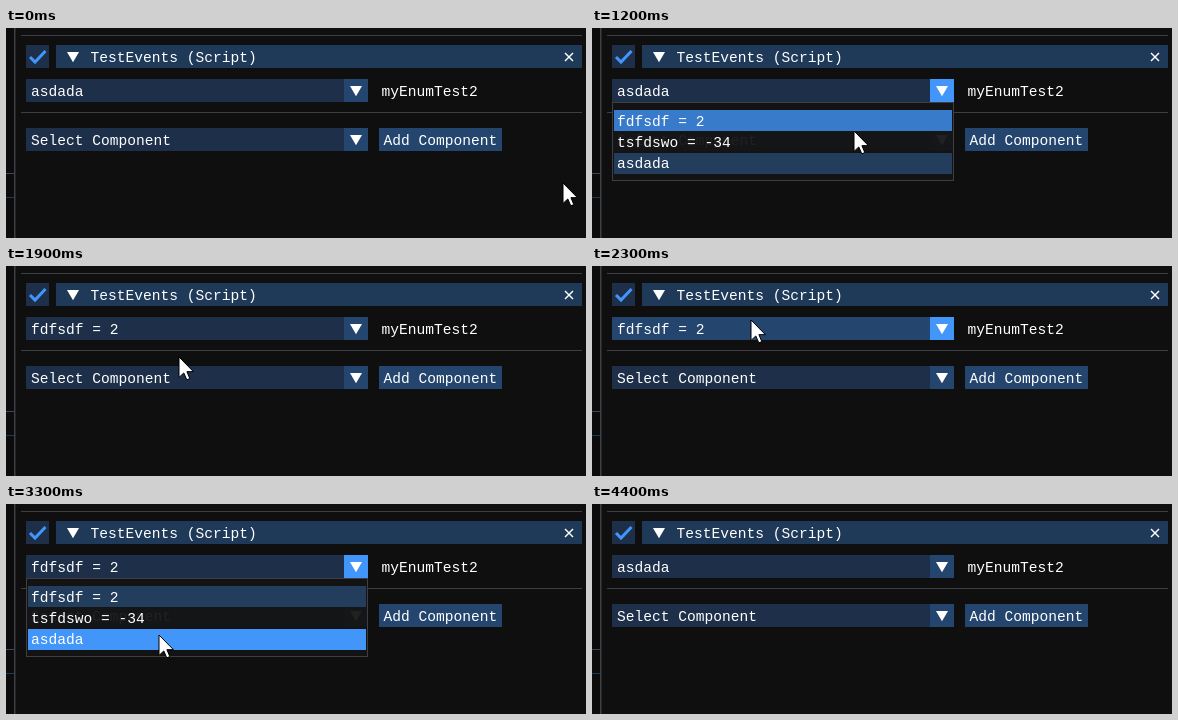
These frames come from a looping animation (580 by 210 pixels, 4600 ms). An HTML page with a canvas:

```html
<!DOCTYPE html>
<html lang="en">
<head>
<meta charset="utf-8">
<title>Component inspector</title>
<style>
  html, body { margin: 0; width: 100%; height: 100%; overflow: hidden; background: #0f0f0f; }
  canvas { display: block; }
</style>
</head>
<body>
<canvas id="stage" width="580" height="210"></canvas>
<script>
const ctx = document.getElementById('stage').getContext('2d');
const LOOP = 4600, STEP = 100;
const FONT = '14.58px "Liberation Mono", monospace';
const FRAME = '#1d2f49', FRAME_HOVER = '#24456d', BUTTON = '#24456d', BRIGHT = '#4296fa';
const HEADER = '#1f3958', SELECTED = '#233d5c', ROW_HOVER = '#387bcb', LINE = '#3e3e46';
const OPTIONS = ['fdfsdf = 2', 'tsfdswo = -34', 'asdada'];

// Pointer waypoints: time, x, y
const PATH = [
  [0, 557, 155], [200, 546, 149], [300, 546, 149], [500, 460, 113], [700, 352, 66],
  [800, 337, 60], [1000, 334, 63], [1200, 262, 103], [1400, 184, 111], [1600, 173, 91],
  [1900, 173, 91], [2100, 162, 64], [2300, 159, 54], [2400, 159, 55], [2600, 160, 93],
  [2800, 160, 97], [3100, 155, 137], [3300, 153, 131], [3500, 153, 134], [3800, 154, 144]
];
const POINTER_END = 4000;
const POINTER = [[0, 0], [0, 17], [4, 13.3], [6.5, 19], [9, 18], [6.6, 12.2], [12, 12.2]];

// Popup spans: open, press, close, chosen option
const PICKS = [[900, 1700, 1800, 0], [2400, 3300, 3400, 2]];

function pointerAt(t) {
  const i = PATH.findIndex(p => p[0] > t);
  if (i < 0) return PATH[PATH.length - 1].slice(1);
  const a = PATH[i - 1], b = PATH[i];
  const k = (t - a[0]) / (b[0] - a[0]);
  return [a[1] + (b[1] - a[1]) * k, a[2] + (b[2] - a[2]) * k];
}

function inside(p, x, y, w, h) {
  return p && p[0] >= x && p[0] < x + w && p[1] >= y && p[1] < y + h;
}

function rect(x, y, w, h, color) {
  ctx.fillStyle = color;
  ctx.fillRect(x, y, w, h);
}

function text(s, x, y) {
  ctx.fillStyle = '#fff';
  ctx.fillText(s, x, y);
}

function trace(points, x = 0, y = 0, scale = 1) {
  ctx.beginPath();
  for (const [px, py] of points) ctx.lineTo(x + px * scale, y + py * scale);
}

function stroke(points, color, width) {
  trace(points);
  ctx.strokeStyle = color;
  ctx.lineWidth = width;
  ctx.stroke();
}

function arrow(cx, cy) {
  trace([[-6, -5], [6, -5], [0, 5.2]], cx, cy);
  ctx.fillStyle = '#fff';
  ctx.fill();
}

function combo(y, label, hover, open) {
  rect(20, y, 342, 23, hover ? FRAME_HOVER : FRAME);
  rect(338, y, 24, 23, hover || open ? BRIGHT : BUTTON);
  arrow(350, y + 12);
  text(label, 25, y + 16.5);
}

function popup(chosen, mouse, pressed) {
  rect(20, 75, 342, 78, 'rgba(20,20,20,.94)');
  ctx.strokeStyle = LINE;
  ctx.lineWidth = 1;
  ctx.strokeRect(20.5, 74.5, 341, 78);
  OPTIONS.forEach((label, i) => {
    const y = 82 + i * 21.4;
    const hover = inside(mouse, 22, y, 338, 21.4);
    const color = hover ? (pressed ? BRIGHT : ROW_HOVER) : i === chosen ? SELECTED : null;
    if (color) rect(22, Math.round(y), 338, 21, color);
    text(label, 25, y + 15.5);
  });
}

function pointer([x, y]) {
  trace(POINTER, x, y, 1.2);
  ctx.closePath();
  ctx.fillStyle = '#fff';
  ctx.strokeStyle = '#000';
  ctx.lineWidth = 1;
  ctx.fill();
  ctx.stroke();
}

function draw(t) {
  const mouse = t < POINTER_END ? pointerAt(t) : null;
  const active = PICKS.find(p => t >= p[0] && t < p[2]);
  const done = PICKS.filter(p => t >= p[2]).pop();
  const chosen = done ? done[3] : 2;
  const free = active ? null : mouse;

  ctx.font = FONT;
  rect(0, 0, 580, 210, '#0f0f0f');
  rect(0, 0, 8, 210, '#0c0c0d');
  rect(0, 145, 8, 1, '#45454a');
  rect(0, 169, 8, 1, '#1b3c50');
  rect(8, 0, 1.5, 210, LINE);
  rect(15, 7, 561, 1, LINE);
  rect(15, 84, 561, 1, LINE);

  rect(20, 17, 23, 23, FRAME);
  stroke([[24, 29], [29, 34], [39.5, 23]], BRIGHT, 3);
  rect(50, 17, 526, 23, HEADER);
  arrow(67, 29);
  text('TestEvents (Script)', 84.5, 33.5);
  stroke([[559, 25], [567, 33]], '#fff', 1.4);
  stroke([[567, 25], [559, 33]], '#fff', 1.4);

  combo(51, OPTIONS[chosen], inside(free, 20, 51, 342, 23), active);
  text('myEnumTest2', 375.5, 67.5);
  combo(100, 'Select Component', inside(free, 20, 100, 342, 23), false);
  rect(373, 100, 123, 23, inside(free, 373, 100, 123, 23) ? BRIGHT : BUTTON);
  text('Add Component', 377.5, 116.5);

  if (active) popup(chosen, mouse, t >= active[1]);
  if (mouse) pointer(mouse);
}

const start = performance.now();
function tick() {
  const t = (performance.now() - start) % LOOP;
  draw(Math.floor(t / STEP) * STEP);
  requestAnimationFrame(tick);
}
tick();
</script>
</body>
</html>
```
